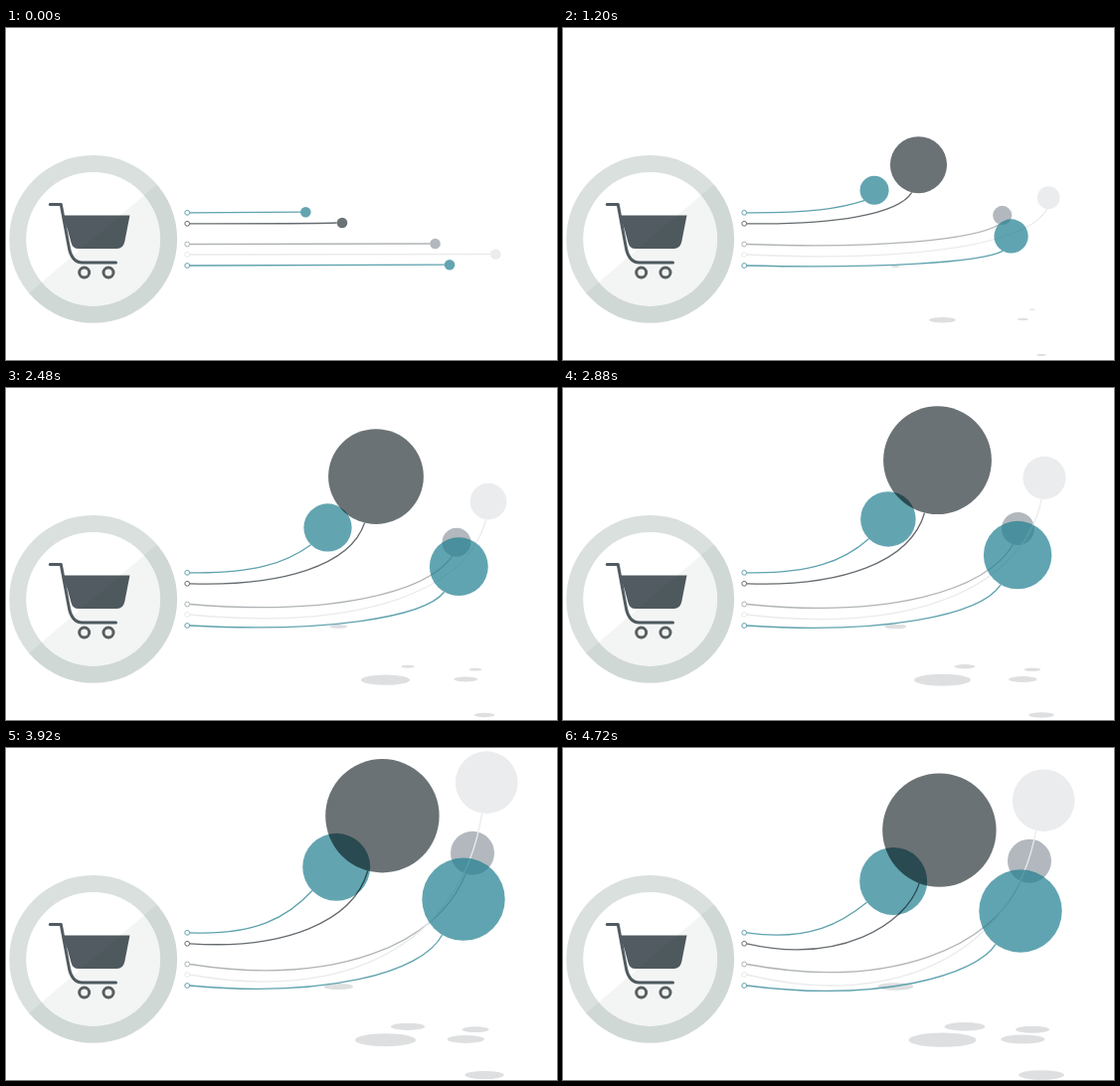
Write an HTML page with a canvas that moves like this. It is 554 px wide and 334 px high and loops after 4.8 s.

```html
<!DOCTYPE html>
<html lang="en">
<head>
<meta charset="utf-8">
<title>Cart and balloons</title>
<style>
  html, body { margin: 0; width: 100%; height: 100%; overflow: hidden; background: #fff; }
  canvas { display: block; }
</style>
</head>
<body>
<canvas id="stage" width="554" height="334"></canvas>
<script>
const ctx = document.getElementById('stage').getContext('2d');
const LOOP = 4800, STEP = 80, TAU = Math.PI * 2;
const SEED_RADIUS = 5.3, ROPE_X = 184.8;
const SAG_START = 3400, SAG_END = 4720;

// Each balloon rises from `from` to `to`, bent towards `via`, in `rise` ms.
// `ease` holds the two inner values of a cubic Bezier over time.
// Rope: start height, final lean, bow per height, slack, end handle.
const GREY = {
  color: '#b2b8be', line: '#b0b4b6', radius: 22, rise: 3700, ease: [0.3, 0.41], sag: 9.4,
  from: [431.5, 217], via: [452, 161], to: [469, 104.3],
  rope: { y: 217.5, lean: 0.3, bow: 0.24, slack: 7, handle: [0.1, 0.78] },
  shadows: [{ x: 481, y: 329, size: 19 }]
};
const PALE = {
  color: '#ebecee', line: '#e9ebec', radius: 31.3, rise: 3700, ease: [0.307, 0.297], sag: 21.4,
  from: [492.3, 227.5], via: [482.2, 99], to: [483.2, 31.3],
  rope: { y: 228, lean: 0.13, bow: 0.16, slack: 15, handle: [0.07, 0.82] },
  shadows: [{ x: 472, y: 283.2, size: 13 }]
};
const TEAL = {
  color: 'rgba(31,126,144,0.7)', line: '#5fa2ae', radius: 41.7, rise: 3400, ease: [0.36, 0.503], sag: 14,
  from: [446, 238.2], via: [453, 194], to: [460, 150],
  rope: { y: 239, lean: 0.52, bow: 0.22, slack: 8, handle: [0.08, 0.76] },
  shadows: [{ x: 462.3, y: 293, size: 18 }]
};
const DARK = {
  color: '#6b7275', line: '#666c70', radius: 57.2, rise: 3040, ease: [0.467, 0.65], sag: 17,
  from: [338, 196], via: [361, 131], to: [378.4, 65.6],
  rope: { y: 196.8, lean: 0.24, bow: 0.05, slack: 18, handle: [0.08, 0.7] },
  shadows: [{ x: 381.5, y: 293.7, size: 30 }]
};
const SMALL_TEAL = {
  color: '#62a5b1', line: '#5fa2ae', blend: 'multiply', radius: 34, rise: 3460, ease: [0.353, 0.52], sag: 16.8,
  from: [301.3, 185.2], via: [321, 151], to: [332.2, 117.2],
  rope: { y: 185.8, lean: 0.78, bow: 0.04, slack: 8, handle: [0.2, 0.64] },
  shadows: [{ x: 334.3, y: 240, size: 14 }, { x: 404, y: 280.3, size: 16.5, delay: 0.41 }]
};
const BALLOONS = [GREY, PALE, TEAL, DARK, SMALL_TEAL];

const clamp = v => Math.max(0, Math.min(1, v));
const mix = (a, b, k) => a + (b - a) * k;
const bend = (a, b, c, k) => mix(mix(a, b, k), mix(b, c, k), k);

function progress({ rise, ease: [a, b] }, t) {
  const u = clamp(t / rise);
  return mix(bend(0, a, b, u), bend(a, b, 1, u), u);
}

const sagAt = t => clamp((t - SAG_START) / (SAG_END - SAG_START)) ** 2;

function disc(x, y, r, fill) {
  ctx.beginPath();
  ctx.arc(x, y, r, 0, TAU);
  ctx.fillStyle = fill;
  ctx.fill();
}

function ring(x, y, r, width, color) {
  ctx.beginPath();
  ctx.arc(x, y, r, 0, TAU);
  ctx.lineWidth = width;
  ctx.strokeStyle = color;
  ctx.stroke();
}

function drawCart() {
  ctx.fillStyle = ctx.strokeStyle = '#515b61';
  ctx.lineWidth = 3;
  ctx.lineCap = ctx.lineJoin = 'round';
  ctx.stroke(new Path2D('M44.3 177.5H55.3L63 219Q65.5 236 77 236H110.5'));
  ctx.fill(new Path2D('M57 188.5H124.5L119.3 215Q117.8 222 111.5 222H73Q67 222 65.5 216L62 203Z'));
  ctx.lineCap = 'butt';
  for (const x of [78.7, 103]) ring(x, 246, 5, 3, '#5c6264');
}

function drawBadge() {
  const x = 87.7, y = 212.4, r = 84.4;
  disc(x, y, r, '#d9e0de');
  disc(x, y, 67.5, '#fff');
  drawCart();
  ctx.save();
  ctx.beginPath();
  ctx.arc(x, y, r, 0, TAU);
  ctx.clip();
  ctx.fillStyle = 'rgba(0,40,25,0.047)';
  ctx.fill(new Path2D('M0 286.4L180 133.2V334H0Z'));
  ctx.restore();
}

function drawRope({ rope, line }, x, y, r, t) {
  const sag = sagAt(t);
  const lean = mix(Math.PI / 2, rope.lean + 0.12 * sag, clamp(t / 450));
  const endX = x - r * Math.sin(lean), endY = y + r * Math.cos(lean);
  const dx = endX - ROPE_X, dy = rope.y - endY;
  ctx.beginPath();
  ctx.moveTo(ROPE_X, rope.y);
  ctx.bezierCurveTo(
    ROPE_X + dx * 0.53, rope.y + rope.bow * dy + rope.slack * sag,
    endX - dx * rope.handle[0], endY + dy * rope.handle[1],
    endX, endY);
  ctx.lineWidth = 1.3;
  ctx.strokeStyle = line;
  ctx.stroke();
  ring(182.2, rope.y, 2.4, 1, line);
}

function drawBalloon(balloon, t) {
  const { from, via, to } = balloon;
  const k = progress(balloon, t);
  const x = bend(from[0], via[0], to[0], k);
  const y = bend(from[1], via[1], to[1], k) + balloon.sag * sagAt(t);
  const r = mix(SEED_RADIUS, balloon.radius, k);
  drawRope(balloon, x, y, r, t);
  ctx.globalCompositeOperation = balloon.blend || 'source-over';
  disc(x, y, r, balloon.color);
  ctx.globalCompositeOperation = 'source-over';
}

function drawShadows(balloon, t) {
  const k = progress(balloon, t);
  for (const { x, y, size, delay = 0 } of balloon.shadows) {
    const rx = size * clamp((k - delay) / (1 - delay)) + 4 * sagAt(t);
    ctx.beginPath();
    ctx.ellipse(x, y, rx, rx * 0.21, 0, 0, TAU);
    ctx.fillStyle = '#dedfe0';
    ctx.fill();
  }
}

function draw(t) {
  ctx.fillStyle = '#fff';
  ctx.fillRect(0, 0, 554, 334);
  drawBadge();
  BALLOONS.forEach(b => drawShadows(b, t));
  BALLOONS.forEach(b => drawBalloon(b, t));
}

const start = performance.now();
function tick() {
  const t = (performance.now() - start) % LOOP;
  draw(Math.floor(t / STEP) * STEP);
  requestAnimationFrame(tick);
}
tick();
</script>
</body>
</html>
```
